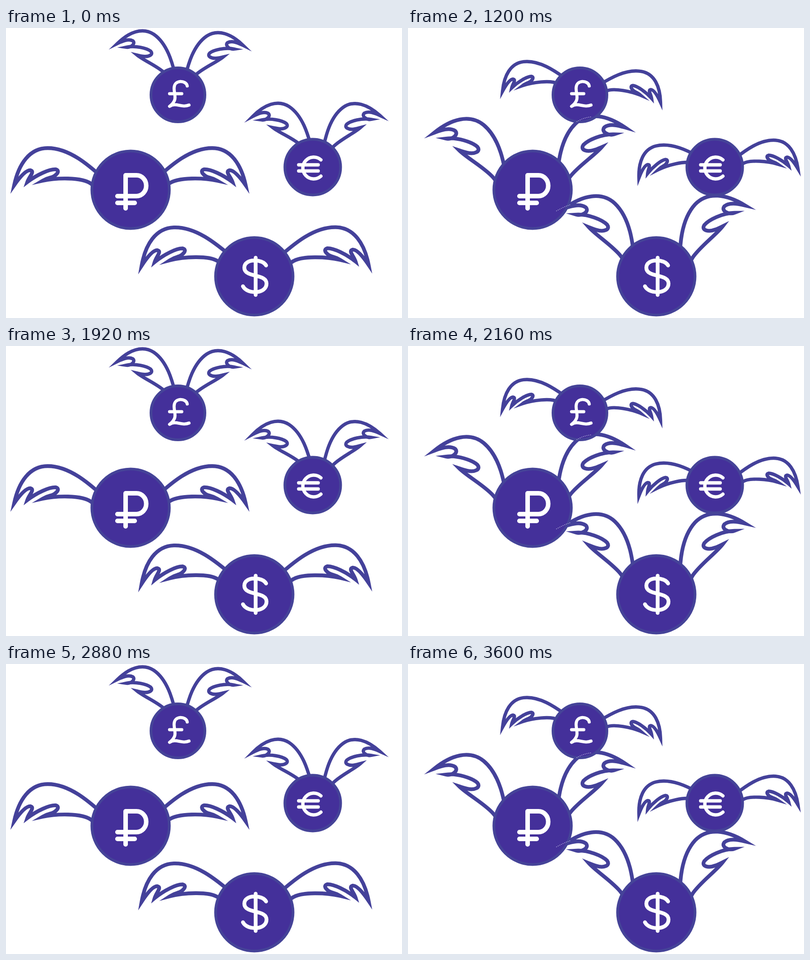
Animation of 874 by 640 pixels, one loop 3.84 s. Source, as an HTML page:

```html
<!DOCTYPE html>
<html lang="en">
<head>
<meta charset="utf-8">
<title>Flying coins</title>
<style>
  html, body { margin: 0; width: 100%; height: 100%; overflow: hidden; background: #fff; }
  svg { display: block; width: 874px; height: 640px; }
  .wings path { fill: none; stroke: #44419a; stroke-miterlimit: 12; vector-effect: non-scaling-stroke; }
  .coin { fill: #44309a; stroke: #454398; stroke-width: 6; }
  .sign { fill: none; stroke: #fff; stroke-linecap: round; stroke-linejoin: round; }
  .glint { fill: none; stroke: #b9b5dc; stroke-width: 1.3; stroke-dasharray: 2 2; }
</style>
</head>
<body>
<svg viewBox="0 0 874 640">
  <g id="pose0" class="wings"></g>
  <g id="pose1" class="wings"></g>
  <g id="coins"></g>
  <path id="glint" class="glint" d="M327 404Q343 395 358 390M372 207Q386 198 405 196"/>
</svg>
<script>
const NS = 'http://www.w3.org/2000/svg';
const BEAT = 240;
const byId = id => document.getElementById(id);

function add(parent, tag, attrs) {
  const el = document.createElementNS(NS, tag);
  for (const key in attrs) el.setAttribute(key, attrs[key]);
  parent.append(el);
}

// Left wings with the tip at the origin; the root runs on behind the coin.
const DOWN = 'M215-27C190-48 140-101 84-101C44-101 20-66 10-19' +
  'C22-36 36-53 46-52C56-49 43-38 39-26' +
  'C60-42 88-55 102-54C114-50 100-38 90-36C82-34 78-32 73-29' +
  'C100-35 160-38 180-22L190-14';
const UP = 'M183 116C177 84 172 11 129-25C98-50 57-38 20-8' +
  'C36-14 54-20 66-12C75-3 58 8 46 5' +
  'C72 2 104 13 115 23C124 34 108 40 92 36C86 35 81 33 75 31' +
  'C92 48 132 70 150 91L162 106';

// Each pose: wing shape, size, and tip x, tip y, turn for the left and the mirrored right wing.
const coins = [
  { x: 379.5, y: 147.5, r: 62.5, line: 7.4, ink: 6.8,
    sign: 'M400 128C398 115 371 113 371 133C371 149 380 158 361 173C375 163 387 177 404 170M361 145H388',
    poses: [[UP, .755, [231, 42, -5.5], [538, 46, -5.5]], [DOWN, .725, [203, 154, -6.5], [562, 179, -10.5]]] },
  { x: 677, y: 307, r: 64.5, line: 7.4, ink: 7.4,
    sign: 'M695 291A24 24 0 1 0 695 327M646 302H689M646 315.5H689',
    poses: [[UP, .755, [530, 203, -6.5], [840, 200, -3.5]], [DOWN, .725, [506, 346, -14], [867, 325, -4]]] },
  { x: 275, y: 357, r: 88.5, line: 8.3, ink: 10,
    sign: 'M264 398V325H288A21.5 23 0 0 1 288 371H246M246 386H284',
    poses: [[DOWN, 1, [8, 366, 0], [539, 366, 0]], [UP, 1, [38, 239, 0], [500, 226, 4.5]]] },
  { x: 548, y: 548, r: 88.5, line: 8.3, ink: 8.4,
    sign: 'M574 524C566 509 526 508 526 529C526 552 575 541 575 564C575 587 533 589 523 570M551 507V589',
    poses: [[DOWN, 1, [290, 544, -2], [810, 542, -1]], [UP, 1, [326, 404, 3.5], [765, 397, 7.5]]] }
];

function addWings(group, line, [shape, size, ...pair]) {
  pair.forEach(([x, y, turn], i) => add(group, 'path', {
    d: shape,
    'stroke-width': line,
    transform: `translate(${x} ${y}) scale(${i ? -size : size} ${size}) rotate(${turn})`
  }));
}

for (const { x, y, r, line, ink, sign, poses } of coins) {
  poses.forEach((pose, i) => addWings(byId('pose' + i), line, pose));
  add(byId('coins'), 'circle', { class: 'coin', cx: x, cy: y, r: r - 3 });
  add(byId('coins'), 'path', { class: 'sign', d: sign, 'stroke-width': ink });
}

const show = (id, on) => byId(id).setAttribute('visibility', on ? 'visible' : 'hidden');

function setPose(flipped) {
  show('pose0', !flipped);
  show('pose1', flipped);
  show('glint', flipped);
}

let start;
function draw(now) {
  start ??= now;
  setPose(Math.floor((now - start) / BEAT) % 2 === 1);
  requestAnimationFrame(draw);
}
setPose(false);
requestAnimationFrame(draw);
</script>
</body>
</html>
```
